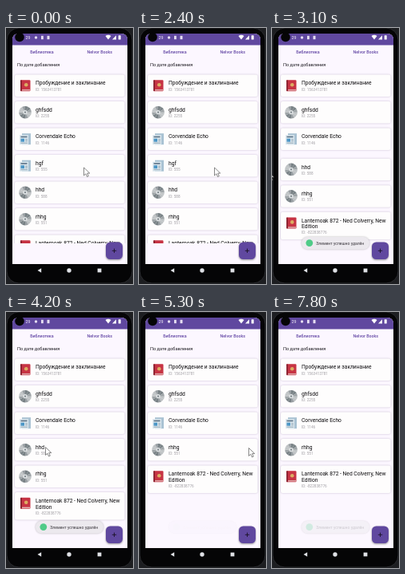
An HTML page for the animation above (7.9 s loop, 159 by 321 pixels).

```html
<!DOCTYPE html>
<html lang="ru">
<head>
<meta charset="utf-8">
<style>
html, body { margin: 0; width: 100%; height: 100%; overflow: hidden; background: #1d1e21; }
svg { display: block; width: 159px; height: 321px; font-family: Roboto, "Open Sans", sans-serif; }
.tab { font-size: 5.3px; font-weight: 500; fill: #6549a6; text-anchor: middle; }
.sort { font-size: 5.6px; fill: #1d1b20; }
.title { font-size: 6.7px; fill: #0c0b0e; }
.id { font-size: 4.7px; fill: #a3a0a6; }
.card { fill: #fefdfd; filter: drop-shadow(0 .9px .9px #a797b399); }
.toast { fill: #ece9ee; filter: drop-shadow(0 .6px 1px #0004); }
.fab { fill: #60489f; filter: drop-shadow(0 1px 1.2px #0006); }
.note { font-size: 5.05px; fill: #39363c; }
</style>
</head>
<body>
<svg viewBox="0 0 159 321">
  <defs>
    <clipPath id="screen"><path d="M8 296V15Q8 7 16 7H144Q152 7 152 15V296Z"/></clipPath>
    <clipPath id="listArea"><rect x="8" y="54" width="144" height="216"/></clipPath>
    <g id="book">
      <rect x="-6" y="-7" width="12.5" height="14" rx="1.2" fill="#c73444"/>
      <rect x="-6" y="-7" width="2" height="14" rx="1" fill="#8f2432"/>
      <rect x="-4" y="5" width="10" height="1.2" fill="#e4c9c5"/>
      <circle cx="1.2" cy="-1" r="2.3" fill="#dcae62"/>
    </g>
    <g id="disc"></g>
    <g id="paper">
      <rect x="-4" y="-7" width="11" height="14" fill="#a9c2d3"/>
      <rect x="-7" y="-5" width="11" height="12" fill="#dbe7ee"/>
      <rect x="-5.5" y="-3.5" width="8" height="1.6" fill="#5a7185"/>
      <rect x="-5.5" y="-.5" width="4.5" height="4" fill="#4b96c6"/>
      <path d="M0 .5H3M0 2.5H3M-5.5 5H3" stroke="#8299a8" stroke-width=".8"/>
    </g>
  </defs>

  <rect x="1" y="0" width="157" height="320" rx="15" fill="#050506" stroke="#2b2c30"/>
  <g clip-path="url(#screen)">
    <rect x="8" y="7" width="144" height="289" fill="#fcf7ff"/>
    <rect x="8" y="7" width="144" height="14.5" fill="#60489f"/>
    <text x="24.5" y="14.2" font-size="5.3" fill="#f3eef8">29</text>
    <g fill="#e6def2">
      <circle cx="37.5" cy="12" r="1.7"/>
      <rect x="44" y="9.8" width="2.8" height="4.4"/>
      <rect x="51.5" y="9.8" width="3" height="4.4"/>
    </g>
    <g fill="#fff">
      <path d="M124.5 10Q128 7.6 131.5 10L128 14.5Z"/>
      <path d="M133 14.5L138 9.3V14.5Z"/>
      <rect x="140.7" y="9.3" width="3" height="5.2" rx=".5"/>
    </g>
    <text class="tab" x="45" y="32.2">Библиотека</text>
    <text class="tab" x="117.3" y="32.2">Nelvor Books</text>
    <text class="sort" x="14" y="48.2">По дате добавления</text>
    <g id="list" clip-path="url(#listArea)"></g>
    <g id="toast">
      <rect class="toast" x="37" y="262" width="85" height="15.5" rx="7.7"/>
      <g id="message">
        <circle cx="46.8" cy="269.6" r="4.4" fill="#4fcb88"/>
        <text class="note" x="55" y="271.6">Элемент успешно удалён</text>
      </g>
    </g>
    <rect class="fab" x="125" y="268.5" width="21" height="21.5" rx="5.5"/>
    <path d="M132.8 279.3H138.2M135.5 276.6V282" stroke="#1b1428" stroke-width=".9"/>
  </g>
  <circle cx="17" cy="11.5" r="5.8" fill="#050506"/>
  <g fill="#dfe1e6">
    <path d="M39.5 304L44.2 301.2V306.8Z"/>
    <circle cx="79" cy="304" r="2.7"/>
    <rect x="114.6" y="301.6" width="4.8" height="4.8"/>
  </g>
  <path id="cursor" d="M0 0V10L2.4 7.8 4 11.5 5.8 10.7 4.2 7.1H7.3Z" fill="#fff" stroke="#555" stroke-width=".7"/>
</svg>

<script>
const LOOP = 7900, TOP = 58.5, PITCH = 33.5, LINE = 7.6;
const rows = [
  ["book", "1563413781", "Пробуждение и заклинание"],
  ["disc", "2255", "ghfsdd"],
  ["paper", "1146", "Corvendale Echo"],
  ["paper", "555", "hgf"],
  ["disc", "588", "hhd"],
  ["disc", "551", "rhhg"],
  ["book", "-822838776", "Lanternoak 872 - Ned Colverry, New", "Edition"]
];

const $ = id => document.getElementById(id);
const move = (el, x, y) => el.setAttribute("transform", `translate(${x} ${y})`);

// Eased progress from 0 to 1 between two times.
function glide(t, from, to) {
  const p = Math.min(1, Math.max(0, (t - from) / (to - from)));
  return (1 - Math.cos(Math.PI * p)) / 2;
}

function drawDisc() {
  const wedges = 12, r = 7.8;
  const rim = a => `${r * Math.cos(a)} ${r * Math.sin(a)}`;
  let out = "";
  for (let i = 0; i < wedges; i++) {
    const a = i * 2 * Math.PI / wedges, b = a + 2 * Math.PI / wedges;
    const light = 63 + 15 * Math.cos(a + b - 1);
    out += `<path d="M0 0L${rim(a)}A${r} ${r} 0 0 1 ${rim(b)}Z" fill="hsl(200 5% ${light}%)"/>`;
  }
  return out + `<circle r="2.6" fill="#dde1e3"/><circle r="1.1" fill="#7d868b"/>`;
}

function drawRow([icon, id, ...lines]) {
  const extra = (lines.length - 1) * LINE;
  const title = lines.map((s, i) => `<text class="title" x="37" y="${12.9 + i * LINE}">${s}</text>`);
  return `<g><rect class="card" x="11" width="137.5" height="${27.5 + extra * .92}" rx="2.5"/>
    <use href="#${icon}" x="24" y="13.7"/>${title.join("")}
    <text class="id" x="37" y="${20.2 + extra}">ID: ${id}</text></g>`;
}

$("disc").innerHTML = drawDisc();
$("list").innerHTML = rows.map(drawRow).join("");
const cards = [...$("list").children];

function render(t) {
  const dragLeft = glide(t, 2430, 2640), dragRight = glide(t, 4300, 4580);
  const back = glide(t, 3500, 4050), rest = glide(t, 5900, 6400);

  // The dragged cards follow the pointer, then fly off.
  const swipes = {
    3: -100 * dragLeft - 50 * glide(t, 2640, 2800),
    4: 88 * dragRight + 62 * glide(t, 4580, 4720)
  };
  const closeFirst = glide(t, 2912, 3162), closeSecond = glide(t, 4750, 5000);
  cards.forEach((card, i) => {
    const slot = i - (i > 3 ? closeFirst : 0) - (i > 4 ? closeSecond : 0);
    move(card, swipes[i] || 0, TOP + slot * PITCH);
  });

  const x = 97.5 - 3 * glide(t, 2200, 2380) - 99.5 * dragLeft + 54.5 * back
    + 88 * dragRight + 11 * rest + 12 * glide(t, 6700, 7100);
  const y = 175 + 5 * dragLeft - 10.5 * back + dragRight - 2.5 * rest;
  move($("cursor"), x, y);

  const toast = glide(t, 2850, 3050) - glide(t, 5080, 5360)
    + glide(t, 5450, 5700) - glide(t, 7650, 7940);
  $("toast").setAttribute("opacity", toast);
  $("message").setAttribute("opacity", toast);
}

const start = performance.now();
function tick() {
  render((performance.now() - start) % LOOP);
  requestAnimationFrame(tick);
}
render(0);
requestAnimationFrame(tick);
</script>
</body>
</html>
```
